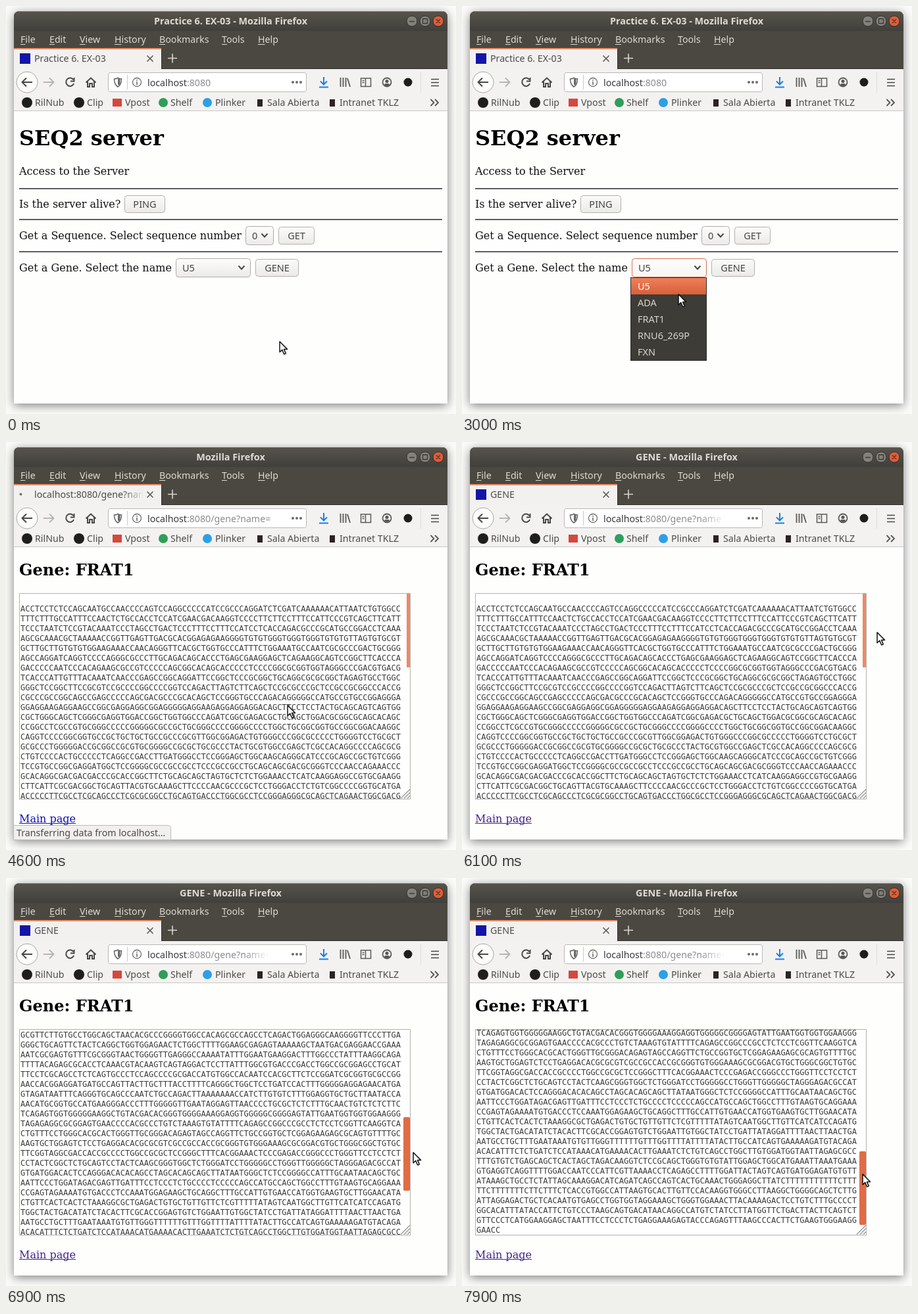
Write an HTML page with a canvas that moves like this. It is 684 px wide and 621 px high and loops after 8 s.

```html
<!DOCTYPE html>
<html lang="en">
<head>
<meta charset="utf-8">
<title>Gene browser</title>
<style>
html, body { margin: 0; width: 100%; height: 100%; overflow: hidden; background: #fbfbfa; }
canvas { display: block; }
</style>
</head>
<body>
<canvas id="stage" width="684" height="621"></canvas>
<script>
const ctx = document.getElementById('stage').getContext('2d');
const LOOP = 8000;
const UI = '14.2px "Noto Sans", "Open Sans", sans-serif';
const UI_BOLD = 'bold 14.4px "Noto Sans", "Open Sans", sans-serif';
const FORM = '14.5px "Noto Sans", "Open Sans", sans-serif';
const SERIF = '"DejaVu Serif", serif';
const MONO = '12px "DejaVu Sans Mono", monospace';
const INK = '#4a4a48';

// Scrolled text height against thumb travel
const SCROLL_RATIO = 438 / 185;

const GENES = ['U5', 'ADA', 'FRAT1', 'RNU6_269P', 'FXN'];
const SEQ = `
ACCTCCTCTCCAGCAATGCCAACCCCAGTCCAGGCCCCCATCCGCCCAGGATCTCGATCAAAAAACATTAATCTGTGGCC
TTTCTTTGCCATTTCCAACTCTGCCACCTCCATCGAACGACAAGGTCCCCTTCTTCCTTTCCATTCCCGTCAGCTTCATT
TCCCTAATCTCCGTACAAATCCCTAGCCTGACTCCCTTTCCTTTCCATCCTCACCAGACGCCCGCATGCCGGACCTCAAA
AGCGCAAACGCTAAAAACCGGTTGAGTTGACGCACGGAGAGAAGGGGTGTGTGGGTGGGTGGGTGTGTGTTAGTGTGCGT
GCTTGCTTGTGTGTGGAAGAAACCAACAGGGTTCACGCTGGTGCCCATTTCTGGAAATGCCAATCGCGCCCGACTGCGGG
AGCCAGGATCAGGTCCCCAGGGCGCCCTTGCAGACAGCACCCTGAGCGAAGGAGCTCAGAAGGCAGTCCGGCTTCACCCA
GACCCCCAATCCCACAGAAGCGCCGTCCCCCAGCGGCACAGCACCCCCTCCCCGGCGCGGTGGTAGGGCCCGACGTGACG
TCACCCATTGTTTACAAATCAACCCGAGCCGGCAGGATTCCGGCTCCCGCGGCTGCAGGCGCGCGGCTAGAGTGCCTGGC
GGGCTCCGGCTTCCGCGTCCGCCCCGGCCCCGGTCCAGACTTAGTCTTCAGCTCCGCGCCCGCTCCGCCGCGGCCCACCG
CGCCCGCCGGCAGCCGAGCCCCCAGCGACGCCCGCACAGCTCCGGGTGCCCAGACAGGGGGCCATGCCGTGCCGGAGGGA
GGAGGAAGAGGAAGCCGGCGAGGAGGCGGAGGGGGAGGAAGAGGAGGAGGACAGCTTCCTCCTACTGCAGCAGTCAGTGG
CGCTGGGCAGCTCGGGCGAGGTGGACCGGCTGGTGGCCCAGATCGGCGAGACGCTGCAGCTGGACGCGGCGCAGCACAGC
CCGGCCTCGCCGTGCGGGCCCCCGGGGGCGCCGCTGCGGGCCCCGGGGCCCCTGGCTGCGGCGGTGCCGGCGGACAAGGC
CAGGTCCCCGGCGGTGCCGCTGCTGCTGCCGCCCGCGTTGGCGGAGACTGTGGGCCCGGCGCCCCCTGGGGTCCTGCGCT
GCGCCCTGGGGGACCGCGGCCGCGTGCGGGGCCGCGCTGCGCCCTACTGCGTGGCCGAGCTCGCCACAGGCCCCAGCGCG
CTGTCCCCACTGCCCCCTCAGGCCGACCTTGATGGGCCTCCGGGAGCTGGCAAGCAGGGCATCCCGCAGCCGCTGTCGGG
TCCGTGCCGGCGAGGATGGCTCCGGGGCGCCGCCGCCTCCCGCCGCCTGCAGCAGCGACGCGGGTCCCAACCAGAAACCC
GCACAGGCGACGACGACCCGCACCGGCTTCTGCAGCAGCTAGTGCTCTCTGGAAACCTCATCAAGGAGGCCGTGCGAAGG
CTTCATTCGCGACGGCTGCAGTTACGTGCAAAGCTTCCCCAACGCCCGCTCCTGGGACCTCTGTCGGCCCCGGTGCATGA
ACCCCCTTCGCCTCGCAGCCCTCGCGCGGCCTGCAGTGACCCTGGCGCCTCCGGGAGGGCGCAGCTCAGAACTGGCGACG
GCGTTCTTGTGCCTGGCAGCTAACACGCCCGGGGTGGCCACAGCGCCAGCCTCAGACTGGAGGGCAAGGGGTTCCCTTGA
GGGCTGCAGTTCTACTCAGGCTGGTGGAGAACTCTGGCTTTTGGAAGCGAGAGTAAAAAGCTAATGACGAGGAACCGAAA
AATCGCGAGTGTTTCGCGGGTAACTGGGGTTGAGGGCCAAAATATTTGGAATGAAGGACTTTGGCCCTATTTAAGGCAGA
TTTTACAGAGCGCACCTCAAACGTACAAGTCAGTAGGACTCCTTATTTGGCGTGACCCGACCTGGCCGCGGAGCCTGCAT
TTCCTCGCAGCCTCTCAGTGCCCTCCAGCCCCGCGACCATGTGGCCACAATCCACGCTTCTCCGGATCGCGGTGCGCCGG
AACCACGGAGGATGATGCCAGTTACTTGCTTTACCTTTTCAGGGCTGGCTCCTGATCCACTTTGGGGGAGGAGAACATGA
GTAGATAATTTCAGGGTGCAGCCCAATCTGCCAGACTTAAAAAAACCATCTTGTGTCTTTGGAGGTGCTGCTTAATACCA
AACATGCGGTGCCATGAAGGGACCCTTTGGGGGTTGAATAGGAGTTAACCCCTGCGCTCTCTTTGCAACTGTCTCTCTTC
TCAGAGTGGTGGGGGAAGGCTGTACGACACGGGTGGGGAAAGGAGGTGGGGGCGGGGAGTATTGAATGGTGGTGGAAGGG
TAGAGAGGCGCGGAGTGAACCCCACGCCCTGTCTAAAGTGTATTTTCAGAGCCGGCCCGCCTCTCCTCGGTTCAAGGTCA
CTGTTTCCTGGGCACGCACTGGGTTGCGGGACAGAGTAGCCAGGTTCTGCCGGTGCTCGGAGAAGAGCGCAGTGTTTTGC
AAGTGCTGGAGTCTCCTGAGGACACGCGCGTCGCCGCCACCGCGGGTGTGGGAAAGCGCGGACGTGCTGGGCGGCTGTGC
TTCGGTAGGCGACCACCGCCCCTGGCCGCGCTCCGGGCTTTCACGGAAACTCCCGAGACCGGGCCCTGGGTTCCTCCTCT
CCTACTCGGCTCTGCAGTCCTACTCAAGCGGGTGGCTCTGGGATCCTGGGGGCCTGGGTTGGGGGCTAGGGAGACGCCAT
GTGATGGACACTCCAGGGACACACAGCCTAGCACAGCAGCTTATAATGGGCTCTCCGGGGCCATTTGCAATAACAGCTGC
AATTCCCTGGATAGACGAGTTGATTTCCTCCCTCTGCCCCTCCCCCAGCCATGCCAGCTGGCCTTTGTAAGTGCAGGAAA
CCGAGTAGAAAATGTGACCCTCCAAATGGAGAAGCTGCAGGCTTTGCCATTGTGAACCATGGTGAAGTGCTTGGAACATA
CTGTTCACTCACTCTAAAGGCGCTGAGACTGTGCTGTTGTTCTCGTTTTTATAGTCAATGGCTTGTTCATCATCCAGATG
TGGCTACTGACATATCTACACTTCGCACCGGAGTGTCTGGAATTGTGGCTATCCTGATTATAGGATTTTAACTTAACTGA
AATGCCTGCTTTGAATAAATGTGTTGGGTTTTTTGTTTGGTTTTATTTTATACTTGCCATCAGTGAAAAAGATGTACAGA
ACACATTTCTCTGATCTCCATAAACATGAAAACACTTGAAATCTCTGTCAGCCTGGCTTGTGGATGGTAATTAGAGCGCC
TTTGTGTCTGAGCAGCTCACTAGCTAGACAAGGTCTCCGCAGCTGGGTGTGTATTGGAGCTGGCATGAAATTAAATGAAA
GTGAGGTCAGGTTTTGGACCAATCCCATTCGTTAAAACCTCAGAGCCTTTTGGATTACTAGTCAGTGATGGAGATGTGTT
ATAAAGCTGCCTCTATTAGCAAAGGACATCAGATCAGCCAGTCACTGCAAACTGGGAGGCTTATCTTTTTTTTTTTCTTT
TTCTTTTTTTCTTCTTTCTCACCGTGGCCATTAAGTGCACTTGTTCCACAAGGTGGGCCTTAAGGCTGGGGCAGCTCTTG
ATTAGGAGACTGCTCACAATGTGAGCCTGGTGGTAGGAAAGCTGGGTGGAAACTTACAAAAGACTCCTGTCTTTGCCCCT
GGCACATTTATACCATTCTGTCCCTAAGCAGTGACATAACAGGCCATGTCTATCCTTATGGTTCTGACTTACTTCAGTCT
GTTCCCTCATGGAAGGAGCTAATTTCCTCCCTCTGAGGAAAGAGTACCCAGAGTTTAAGCCCACTTCTGAAGTGGGAAGG
GAACC`.split('\n');

// Pointer stops: time, x, y
const POINTER = [
  [0, 415, 510], [500, 412, 507], [700, 393, 483], [900, 384, 461], [1000, 372, 434],
  [1200, 356, 416], [1300, 342, 402], [1400, 334, 395], [3000, 328, 438], [3100, 328, 510],
  [3200, 326, 474], [4100, 356, 450], [4200, 400, 420], [4300, 427, 400], [4900, 426, 390],
  [5700, 431, 387], [5800, 458, 370], [5900, 515, 334], [6000, 585, 303], [6100, 630, 289],
  [6200, 622, 296], [6300, 611, 302], [6500, 611, 304], [6600, 612, 309], [6700, 616, 345],
  [6800, 619, 382], [6900, 618, 417], [7000, 619, 455], [7100, 618, 490], [7200, 616, 515],
  [7300, 615, 526], [7400, 613, 523], [7500, 611, 521], [7600, 609, 519], [7900, 608, 450]
];
// Scroll thumb stops: time, offset
const THUMB = [[0, 0], [6500, 3], [6600, 7], [6700, 42], [6800, 92], [6900, 133],
  [7000, 160], [7100, 177], [7200, 183], [7300, 185]];

const at = (stops, t) => stops.findLast(s => s[0] <= t).slice(1);

function text(s, x, y, font = UI, color = INK, align = 'left') {
  ctx.font = font;
  ctx.fillStyle = color;
  ctx.textAlign = align;
  ctx.fillText(s, x, y);
}
function rect(x, y, w, h, color) {
  ctx.fillStyle = color;
  ctx.fillRect(x, y, w, h);
}
function round(x, y, w, h, r, fill, stroke) {
  ctx.beginPath();
  ctx.roundRect(x, y, w, h, r);
  if (fill) { ctx.fillStyle = fill; ctx.fill(); }
  if (stroke) { ctx.strokeStyle = stroke; ctx.lineWidth = 1; ctx.stroke(); }
}
function disc(x, y, r, fill, stroke, width = 1) {
  ctx.beginPath();
  ctx.arc(x, y, r, 0, 7);
  if (fill) { ctx.fillStyle = fill; ctx.fill(); }
  if (stroke) { ctx.strokeStyle = stroke; ctx.lineWidth = width; ctx.stroke(); }
}
function path(d, color, width = 1.8) {
  ctx.strokeStyle = color;
  ctx.lineWidth = width;
  ctx.stroke(new Path2D(d));
}
function grad(x0, y0, x1, y1, a, b) {
  const g = ctx.createLinearGradient(x0, y0, x1, y1);
  g.addColorStop(0, a);
  g.addColorStop(1, b);
  return g;
}
function clipped(x, y, w, h, draw) {
  ctx.save();
  ctx.beginPath();
  ctx.rect(x, y, w, h);
  ctx.clip();
  draw();
  ctx.restore();
}

function frame() {
  rect(0, 0, 684, 621, '#fbfbfa');
  ctx.save();
  ctx.shadowColor = 'rgba(0,0,0,.5)';
  ctx.shadowBlur = 15;
  ctx.shadowOffsetY = 3;
  round(12, 8, 659, 597, [8, 8, 0, 0], '#4a4841');
  ctx.restore();
  round(12, 8, 659, 30, [8, 8, 0, 0], grad(0, 8, 0, 38, '#56544c', '#403f3a'));
  rect(18, 8, 647, 1, '#6a6860');
  rect(12, 38, 659, 58, '#4a4840');
  rect(12, 95, 659, 1, '#33322e');
  for (const x of [617, 637, 657]) disc(x, 23, 8, x > 640 ? '#e35b36' : '#83817a', '#33322e');
  path('M613 23.5h8M633.5 19.5h7v7h-7zM654 20l6 6M660 20l-6 6', '#3a3935', 1.3);

  const menu = { File: 22, Edit: 66, View: 112, History: 165, Bookmarks: 233, Tools: 328, Help: 383 };
  for (const [name, x] of Object.entries(menu)) {
    text(name, x, 56, UI, '#dfdbd2');
    rect(x, 58, ctx.measureText(name[0]).width, 1, '#dfdbd2');
  }
}

function tabs(s) {
  text(s.title + 'Mozilla Firefox', 341.5, 28, UI_BOLD, '#dfdbd2', 'center');
  rect(12, 64, 224, 32, '#f2f1ef');
  rect(12, 64, 224, 2, '#e8906a');
  rect(236, 66, 1, 30, '#33322e');
  if (s.loading) disc(22.5 + 7 * Math.sin((s.t - 4600) / 130), 79.5, 2, '#77766f');
  else rect(21, 72, 16, 16, '#1414a8');
  clipped(43, 66, 166, 28, () => text(s.tab, 43, 85));
  rect(178, 68, 32, 26, grad(178, 0, 209, 0, 'rgba(242,241,239,0)', '#f2f1ef'));
  path('M214.5 75.5l9 9M223.5 75.5l-9 9', '#555450', 1.5);
  path('M246 79.5h14M253 72.5v14', '#d8d5cc', 1.6);
}

function toolbar(s) {
  rect(12, 96, 659, 64, '#f3f2f0');
  rect(12, 159, 659, 1, '#c9c8c6');
  disc(32, 116, 16, '#fcfcfb', '#aaa9a6');
  path('M40 116H25M31 109.5l-6.5 6.5 6.5 6.5', '#484846', 2);
  path('M57 116h15M66 109.5l6.5 6.5-6.5 6.5', '#b7b6b3', 2);
  path('M102.5 112.2a6.2 6.2 0 1 0 .6 6M103.5 109v5.5h-5.5', '#484846', 2);
  path('M121.5 116.5l7.5-7 7.5 7M124 115v8h3v-5h4v5h3v-8', '#484846', 2);

  round(155.5, 101.5, 301, 29, 3, '#fff', '#b9b8b5');
  path('M170 109.5c2 1.4 3.7 1.5 5.5 1.5 0 6-1.5 9.5-5.5 12-4-2.5-5.5-6-5.5-12 1.8 0 3.5-.1 5.5-1.5z', '#6b6b68', 1.6);
  rect(170, 111, 3.5, 9, '#6b6b68');
  rect(184, 105, 1, 22, '#c9c8c6');
  disc(199, 116, 6.5, null, '#6b6b68', 1.3);
  path('M199 112v1.7M199 115v5', '#6b6b68', 1.6);
  clipped(215, 103, 187, 26, () => {
    text('localhost', 215, 122, UI, '#38383a');
    const w = ctx.measureText('localhost').width;
    text(':8080' + s.url, 215 + w, 122, UI, '#8b8b8d');
  });
  if (s.fadeUrl) rect(360, 104, 43, 24, grad(362, 0, 400, 0, 'rgba(255,255,255,0)', '#fff'));
  for (const x of [436, 442, 448]) disc(x, 116, 2, '#6b6b68');

  path('M483 108v11M478 114.5l5 5 5-5M476 123.5h14', '#1c7fe0', 2);
  path('M508.5 109v14M512.5 109v14M516.5 109v14M519 110l4 13', '#5a5a58', 1.8);
  path('M539.5 110h15v12.5h-15zM546.5 110v12.5M541.5 113.5h3M541.5 116.5h3', '#5a5a58', 1.5);
  disc(579, 116, 6.5, null, '#5a5a58', 1.8);
  disc(579, 114.5, 2.6, '#5a5a58');
  round(575, 118, 8, 4, 2, '#5a5a58');
  disc(611, 116, 6.5, '#1d1d1c');
  rect(630, 100, 1, 32, '#dddcd9');
  path('M646 111.5h12M646 116.5h12M646 121.5h12', '#484846', 1.7);

  const marks = [['RilNub', 44], ['Clip', 123], ['Vpost', 181], ['Shelf', 250], ['Plinker', 318],
    ['Sala Abierta', 397], ['Intranet TKLZ', 507]];
  for (const [name, x] of marks) text(name, x, 152);
  disc(32, 147, 8, '#1e1e1d');
  disc(111, 147, 8, '#1e1e1d');
  rect(162, 141, 14, 12, '#d5483c');
  disc(239, 147, 7, '#2f9e5a');
  disc(306, 147, 7, '#2ba0e8');
  rect(382, 142, 8, 11, '#2c2422');
  rect(492, 142, 8, 11, '#2c2422');
  path('M645.5 142l5 5-5 5M652 142l5 5-5 5', '#555450', 1.8);
  rect(12, 160, 659, 445, '#fefefd');
}

function button(label, x, y, w, h, down) {
  const face = down ? grad(0, y, 0, y + h, '#d5d4d2', '#e2e1df') : grad(0, y, 0, y + h, '#fbfbfa', '#ebeae8');
  round(x + .5, y + .5, w - 1, h - 1, 4, face, '#b1b0ad');
  text(label, x + w / 2, y + h / 2 + 5.5, FORM, '#444442', 'center');
}
function select(label, x, y, w, h, focus, hover) {
  const face = grad(0, y, 0, y + h, '#fdfdfc', hover ? '#f6f5f4' : '#ebeae8');
  round(x + .5, y + .5, w - 1, h - 1, 4, face, focus ? '#d4714b' : '#adaca9');
  text(label, x + 10, y + h / 2 + 5.5, FORM, '#444442');
  const cx = x + w - 14, cy = y + h / 2;
  path(`M${cx - 4.5} ${cy - 3}l4.5 5 4.5-5`, '#484846', 2);
}

function formPage(s) {
  const body = (str, y) => text(str, 20, y, '16px ' + SERIF, '#111');
  text('SEQ2 server', 20, 212, 'bold 32px ' + SERIF, '#000');
  body('Access to the Server', 257);
  body('Is the server alive?', 307);
  body('Get a Sequence. Select sequence number', 355);
  body('Get a Gene. Select the name', 404);
  for (const y of [277, 324, 373]) rect(20, y, 643, 2, '#615d5e');
  button('PING', 180, 288, 62, 27);
  select('0', 364, 335, 43, 29);
  button('GET', 414, 336, 55, 27);
  select(s.gene, 258, 384, 114, 29, s.focus, s.hover);
  button('GENE', 379, 385, 66, 27, s.down);
  if (!s.open) return;
  rect(256, 413, 116, 127, '#2c2b28');
  rect(257, 414, 114, 125, '#3d3c37');
  const top = 414 + 25 * s.row;
  rect(257, top, 114, 25, grad(0, top, 0, top + 25, '#ee7f5a', '#d95f38'));
  GENES.forEach((g, i) => text(g, 267, 432 + 25 * i, FORM, i === s.row ? '#fff' : '#d9d5cc'));
}

function genePage(s) {
  text('Gene: FRAT1', 20, 203, 'bold 24px ' + SERIF, '#000');
  rect(20, 230, 595, 314, '#b3b2b0');
  rect(21, 231, 593, 312, '#fff');
  const scroll = Math.round(s.thumb * SCROLL_RATIO);
  clipped(21, 231, 593, 312, () => {
    SEQ.forEach((line, i) => {
      const y = 243 + 15 * i - scroll;
      if (y > 225 && y < 560) text(line, 22, y, MONO, '#3c3c3c');
    });
  });
  path('M600 542.5l14-14M605 542.5l9-9M610 542.5l4-4', '#9c9b99', 1.4);
  if (s.wide) round(604, 231 + s.thumb, 10, 112, 2, '#e06c45');
  else rect(609, 231, 5, 112, '#e98b67');

  const link = s.done ? '#45248a' : '#1010b8';
  text('Main page', 20, 579, '16px ' + SERIF, link);
  rect(20, 580, ctx.measureText('Main page').width, 1, link);
  if (s.loading && !s.done) {
    round(11.5, 583.5, 239, 22, [0, 4, 0, 0], '#f1f0ee', '#bcbbb8');
    text('Transferring data from localhost…', 16, 600);
  }
}

function pointer([x, y]) {
  ctx.save();
  ctx.translate(x + .5, y + .3);
  ctx.scale(1.06, 1.06);
  const arrow = new Path2D('M.5 .5V15.5L4 12.3 6.8 18.6 9.3 17.5 6.6 11.4H11.3Z');
  ctx.lineJoin = 'round';
  ctx.fillStyle = '#fff';
  ctx.fill(arrow);
  ctx.strokeStyle = '#111';
  ctx.lineWidth = 1.4;
  ctx.stroke(arrow);
  ctx.restore();
}

function stateAt(t) {
  const loaded = t >= 4500, done = t >= 4700;
  const pos = at(POINTER, t);
  return {
    t, loaded, done, pos,
    title: done ? 'GENE - ' : loaded ? '' : 'Practice 6. EX-03 - ',
    tab: done ? 'GENE' : loaded ? 'localhost:8080/gene?name=FRAT1' : 'Practice 6. EX-03',
    url: loaded ? '/gene?name=FRAT1' : '',
    fadeUrl: done,
    loading: loaded && t < 5000,
    gene: t >= 3700 ? 'FRAT1' : 'U5',
    hover: t >= 1400,
    focus: t >= 2200,
    open: t >= 2200 && t < 3700,
    row: t < 3100 ? 0 : Math.floor((pos[1] - 414) / 25),
    down: t >= 4400,
    wide: t >= 6300,
    thumb: at(THUMB, t)[0]
  };
}

function render(now) {
  const t = Math.floor(now % LOOP / 100) * 100;
  const s = stateAt(t);
  frame();
  tabs(s);
  toolbar(s);
  (s.loaded ? genePage : formPage)(s);
  pointer(s.pos);
}

const start = performance.now();
function tick() {
  render(performance.now() - start);
  requestAnimationFrame(tick);
}
tick();
</script>
</body>
</html>
```
